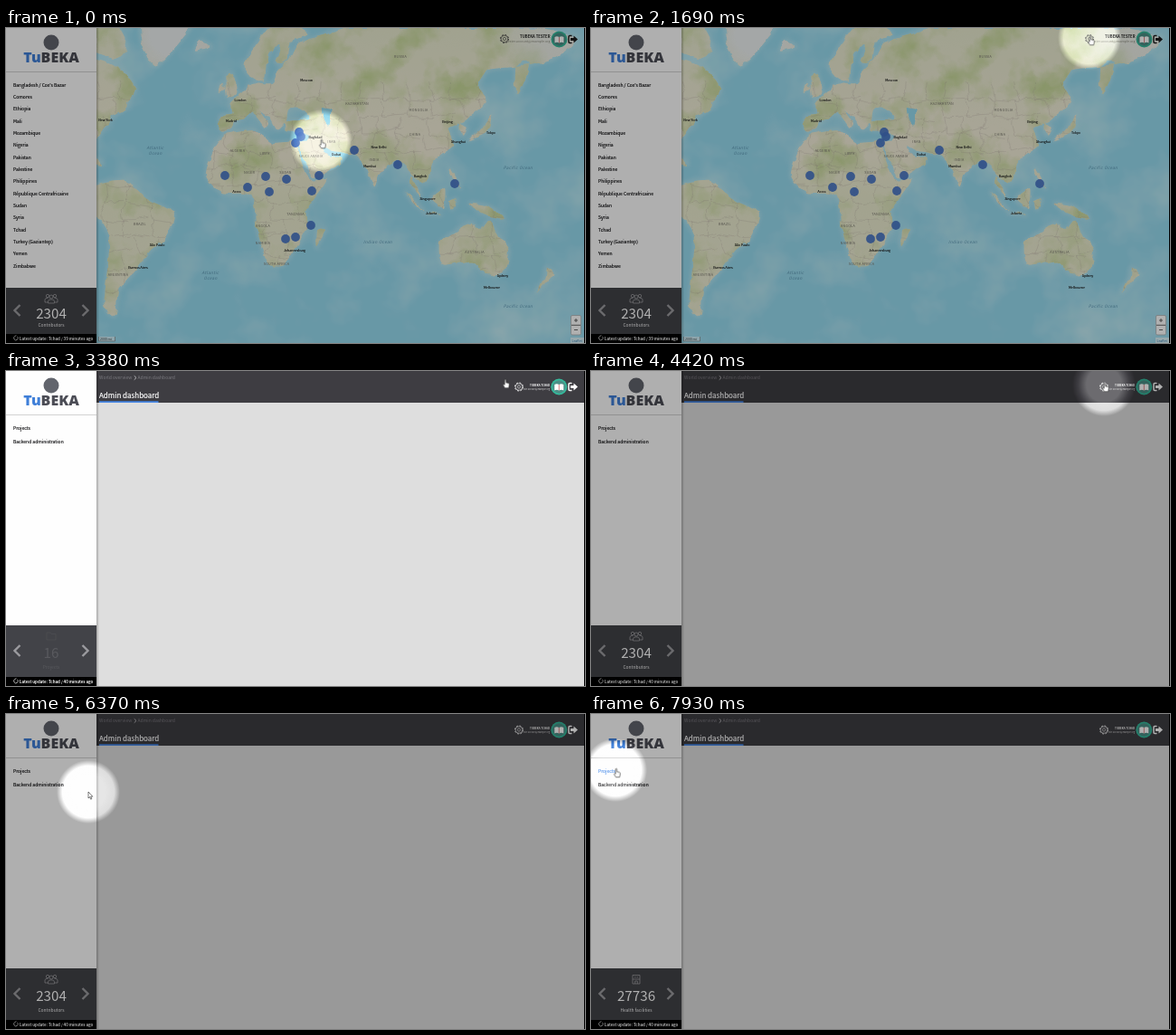
Recreate the animation shown at these times as an HTML page. Size 640 by 348 pixels, loop 8 s.

```html
<!DOCTYPE html>
<html>
<head>
<meta charset="utf-8">
<title>Admin dashboard</title>
<style>
html, body { margin: 0; width: 100%; height: 100%; overflow: hidden; background: #dedede; }
svg { position: absolute; left: 0; top: 0; width: 100vw; height: 100vh; }
text { font-family: "Noto Sans CJK SC", "Noto Sans CJK JP", "Noto Sans CJK", "Noto Sans", sans-serif; }
.mid { text-anchor: middle; }
.end { text-anchor: end; }
.line { fill: none; stroke: currentColor; }
.border { fill: none; stroke: #a99d98; stroke-width: .5; opacity: .45; }
.country { font-size: 3.7px; fill: #77746c; letter-spacing: .25px; }
.city { font-size: 3.6px; fill: #1c1c1c; stroke: #1c1c1c; stroke-width: .12; }
.ocean { font-size: 4.6px; font-style: italic; fill: #5d97b3; letter-spacing: .3px; }
.menu { font-size: 5px; fill: #1d1d1f; stroke: #1d1d1f; stroke-width: .17; }
.status { font-size: 4.4px; font-weight: 700; fill: #fff; }
.logo { font: 800 16px "Open Sans", sans-serif; fill: #4b4c55; }

#map, #dash { will-change: opacity; }
#map { animation: old 8s step-end infinite; }
#dash { animation: fresh 8s step-end infinite; }
#pointer { animation: move 8s infinite; }
#dim { animation: dim 8s step-end infinite; }
#hand { animation: hand 8s step-end infinite; }
#arrow { animation: arrow 8s step-end infinite; }
#link { animation: hover 8s step-end infinite; }
@keyframes old { 0% { opacity: 1 } 42.25%, 100% { opacity: 0 } }
@keyframes fresh { 0% { opacity: 0 } 42.25%, 100% { opacity: 1 } }
@keyframes dim { 0% { opacity: 1 } 42.25% { opacity: 0 } 53.625% { opacity: .5 } 55.25%, 100% { opacity: 1 } }
@keyframes hand { 0% { opacity: 1 } 65% { opacity: 0 } 91%, 100% { opacity: 1 } }
@keyframes arrow { 0% { opacity: 0 } 65% { opacity: 1 } 91%, 100% { opacity: 0 } }
@keyframes hover { 0% { fill: #1d1d1f; stroke: #1d1d1f } 91%, 100% { fill: #3d84ea; stroke: #3d84ea } }
@keyframes move {
  0% { transform: translate(348px, 125px); animation-timing-function: step-end }
  3.25% { transform: translate(348px, 125px); animation-timing-function: steps(7) }
  14.625% { transform: translate(526px, 46px); animation-timing-function: steps(4) }
  21.125% { transform: translate(551px, 11px); animation-timing-function: step-end }
  45.5% { transform: translate(551px, 11px); animation-timing-function: steps(4) }
  52% { transform: translate(567px, 15px); animation-timing-function: step-end }
  63.375% { transform: translate(567px, 15px); animation-timing-function: steps(5) }
  71.5% { transform: translate(322px, 58px); animation-timing-function: steps(2) }
  74.75% { transform: translate(203px, 66px); animation-timing-function: steps(3) }
  79.625% { transform: translate(91px, 86px); animation-timing-function: steps(4) }
  86.125% { transform: translate(41px, 67px); animation-timing-function: steps(4) }
  92.625%, 100% { transform: translate(27px, 62px) }
}
</style>
</head>
<body>
<svg id="map" viewBox="0 0 640 348" preserveAspectRatio="none">
  <defs>
    <linearGradient id="soil" x2="0" y2="1">
      <stop offset="0" stop-color="#e9ebd0"/><stop offset=".38" stop-color="#f5f0db"/>
      <stop offset=".54" stop-color="#ebedcf"/><stop offset="1" stop-color="#f2efd9"/>
    </linearGradient>
    <radialGradient id="ice">
      <stop offset=".4" stop-color="#eef2f2"/><stop offset="1" stop-color="#eef2f2" stop-opacity="0"/>
    </radialGradient>
    <filter id="ridges" x="0" y="0" width="1" height="1" color-interpolation-filters="sRGB">
      <feTurbulence type="fractalNoise" baseFrequency=".014" numOctaves="4" seed="8"/>
      <feColorMatrix values="0 0 0 0 .78  0 0 0 0 .94  0 0 0 0 .97  2 0 0 0 -.9"/>
    </filter>
    <filter id="forest" x="0" y="0" width="1" height="1" color-interpolation-filters="sRGB">
      <feTurbulence type="fractalNoise" baseFrequency=".025" numOctaves="4" seed="3"/>
      <feColorMatrix values="0 0 0 0 .78  0 0 0 0 .85  0 0 0 0 .6  2.4 0 0 0 -1.05"/>
    </filter>
    <filter id="rough" x="0" y="0" width="1" height="1">
      <feTurbulence type="fractalNoise" baseFrequency=".09" numOctaves="2" seed="5" result="noise"/>
      <feDisplacementMap in="SourceGraphic" in2="noise" scale="7" xChannelSelector="R" yChannelSelector="G"/>
    </filter>
    <filter id="soft"><feGaussianBlur stdDeviation="2.2"/></filter>
    <clipPath id="land"><path id="shore"/></clipPath>
  </defs>
  <rect width="640" height="348" fill="#97dcf1"/>
  <rect x="100" width="540" height="348" filter="url(#ridges)"/>
  <path id="shelf" fill="#c3edf5" stroke="#c3edf5" stroke-width="4" opacity=".6" filter="url(#soft)"/>
  <g filter="url(#rough)">
    <rect width="640" height="348" fill="none"/>
    <g clip-path="url(#land)">
      <rect width="640" height="348" fill="url(#soil)"/>
      <rect x="100" width="540" height="348" filter="url(#forest)"/>
      <ellipse cx="185" cy="8" rx="65" ry="55" fill="url(#ice)"/>
      <ellipse cx="630" cy="10" rx="95" ry="60" fill="url(#ice)" opacity=".7"/>
      <g id="borders"></g>
    </g>
    <path id="lake" fill="#97dcf1"/>
  </g>
  <g id="labels"></g>
  <g id="sites" fill="#4774c6" fill-opacity=".92"></g>
  <g color="#3a3a3c">
    <use href="#gear" x="551" y="12"/>
    <text class="end" x="601.5" y="11.3" font-size="4.2" font-weight="700" fill="#222">TUBEKA TESTER</text>
    <text class="end" x="601.5" y="16" font-size="3.6" fill="#8d8d80">tester.account@example.org</text>
    <use href="#avatar" x="611.5" y="12.5"/>
    <use href="#exit" x="626.5" y="12.5" color="#1c1c1e"/>
  </g>
  <rect x="624.5" y="317.5" width="11" height="21.5" rx="1.5" fill="#fff" stroke="#aaa" stroke-width=".7"/>
  <path d="M625 328.3H635M628 323H632M630 321V325M628 333.5H632" stroke="#444" stroke-width=".8"/>
  <rect x="624" y="342" width="16" height="6" fill="#fff" opacity=".6"/>
  <text x="625.5" y="346.5" font-size="3.6" fill="#2f78a8">Leaflet</text>
  <rect x="102.5" y="341" width="18" height="5" fill="#fff" opacity=".5"/>
  <path class="line" d="M102.5 341V346H120.5V341" stroke-width=".6" color="#777"/>
  <text x="104" y="345" font-size="3.5" fill="#333">2000 mi</text>
  <rect width="100" height="348" fill="#fefefe"/>
  <g id="countries"></g>
  <rect y="287" width="100" height="51" fill="#424348"/>
  <rect y="338" width="100" height="10"/>
  <text class="status" x="15" y="344.6">Latest update: Tchad / 39 minutes ago</text>
</svg>

<svg id="dash" viewBox="0 0 640 348" preserveAspectRatio="none">
  <rect width="640" height="348" fill="#dedede"/>
  <rect x="100" width="540" height="35" fill="#3e3d42"/>
  <g font-size="5" fill="#7c7b80">
    <text x="103" y="9.4">World overview</text><text x="145.5" y="9.4">Admin dashboard</text>
  </g>
  <path class="line" d="M141.7 5.3L144 7.5L141.7 9.7" color="#b5b5b8"/>
  <text x="103" y="30.3" font-size="8" fill="#fff" stroke="#fff" stroke-width=".2">Admin dashboard</text>
  <rect x="103" y="33.3" width="65.5" height="1.7" fill="#4789e8"/>
  <g color="#fff" fill="#fff">
    <use href="#gear" x="567" y="17.5"/>
    <text class="end" x="601" y="17" font-size="2.9" font-weight="700">TUBEKA TCHAD</text>
    <text class="end" x="601" y="21" font-size="2.3" fill="#ddd">tester.account@example.org</text>
    <use href="#avatar" x="611.3" y="17.5"/>
    <use href="#exit" x="626.5" y="17.5"/>
  </g>
  <rect width="100" height="348" fill="#fefefe"/>
  <text id="link" class="menu" x="8" y="65">Projects</text>
  <text class="menu" x="8" y="79.8">Backend administration</text>
  <rect y="281" width="100" height="57" fill="#424348"/>
  <rect y="338" width="100" height="10"/>
  <text class="status" x="15" y="344.6">Latest update: Tchad / 40 minutes ago</text>
</svg>

<svg viewBox="0 0 640 348" preserveAspectRatio="none">
  <defs>
    <radialGradient id="light" gradientUnits="userSpaceOnUse" cx="0" cy="0" r="35">
      <stop offset=".55" stop-color="#fff" stop-opacity=".24"/>
      <stop offset=".82" stop-color="#fff" stop-opacity="0"/>
      <stop offset=".82" stop-color="#000" stop-opacity="0"/>
      <stop offset="1" stop-color="#000" stop-opacity=".31"/>
    </radialGradient>
    <linearGradient id="edge"><stop stop-opacity=".25"/><stop offset="1" stop-opacity="0"/></linearGradient>
    <g id="gear" class="line">
      <circle r="4.5" stroke-dasharray="1.77"/>
      <circle r="3.8" stroke-width=".6"/><circle r="1.6" stroke-width=".6"/>
    </g>
    <g id="avatar">
      <circle r="9" fill="#35b99b"/><circle r="7.2" fill="#4b8f86"/>
      <path d="M-5-2.5Q-2.5-4 0-2.5Q2.5-4 5-2.5V4Q2.5 2.5 0 4Q-2.5 2.5-5 4Z" fill="#fff"/>
      <path class="line" d="M0-2.5V4" stroke-width=".8" color="#c66"/>
    </g>
    <g id="exit">
      <path class="line" d="M-1-4H-3.5Q-4.5-4-4.5-3V3Q-4.5 4-3.5 4H-1" stroke-width="1.5"/>
      <path d="M-2.5-1.5H1V-4L5.5 0L1 4V1.5H-2.5Z" fill="currentColor"/>
    </g>
    <g id="people" class="line" stroke-width=".7">
      <circle cx="-4" cy="-3" r="1.7"/><circle cx="4" cy="-3" r="1.7"/><circle cy="-2" r="2"/>
      <path d="M-3.5 5V3Q-3.5 .8 0 .8T3.5 3V5ZM-4 4H-7V1Q-7-.8-3.5-.8M4 4H7V1Q7-.8 3.5-.8"/>
    </g>
    <path id="building" class="line" stroke-width=".7" d="M-4 5V-4.5H4V5ZM-4 0H4M-1.3 5V2H1.3V5M-2-2.2H-.5M.5-2.2H2"/>
    <path id="folder" class="line" stroke-width=".7" d="M-5 4V-4H-1L0-2.5H5V4Z"/>
  </defs>
  <rect x="100" width="3" height="348" fill="url(#edge)"/>
  <rect y="48" width="100" height="1" fill="#d2d2d2"/>
  <circle cx="50" cy="16" r="8.5" fill="#62656d"/>
  <text class="logo mid" x="50" y="38"><tspan fill="#3f7fd8">Tu</tspan>BEKA</text>
  <path class="line" d="M10 340.4A2.3 2.3 0 1 0 12.6 340.9M10 340.4L11.4 339.5" stroke-width=".7" color="#fff"/>
  <path id="chevrons" class="line" d="M15.5 303L9.5 309L15.5 315M84.5 303L90.5 309L84.5 315" stroke-width="2.4" color="#9b9b9f"/>
  <g id="counter" color="#a9a9ad" fill="#fff">
    <use id="icon" x="50"/>
    <text id="number" class="mid" x="50" font-size="15.2"></text>
    <text id="caption" class="mid" x="50" font-size="4.9"></text>
  </g>
  <rect x="639" width="1" height="348"/>
  <g id="pointer">
    <rect id="dim" x="-700" y="-400" width="1440" height="800" fill="url(#light)"/>
    <g fill="#fff" stroke="#222" stroke-width=".6">
      <path id="hand" transform="translate(.8 .3)" d="M-.7 4V-1.5Q.1-2.6 .9-1.5V1.6L3.6 2.2Q4.6 2.5 4.5 3.6L3.8 7.5H-.3L-2.4 4.3Q-2 3-.7 4Z"/>
      <path id="arrow" d="M0 0V7L1.6 5.6L2.7 8.2L3.8 7.7L2.7 5.2H4.8Z"/>
    </g>
  </g>
</svg>

<script>
const $ = id => document.getElementById(id);

function add(parent, tag, attrs, text = '') {
  const el = document.createElementNS('http://www.w3.org/2000/svg', tag);
  for (const key in attrs) el.setAttribute(key, attrs[key]);
  el.textContent = text;
  parent.append(el);
}

// Mercator projection, 1.97 px per degree
const project = ([lon, lat]) =>
  [254.5 + 1.97 * lon, 191 - 112.9 * Math.asinh(Math.tan(lat * Math.PI / 180))];

// Closed spline through a few "lon lat" key points
function coast(text) {
  const p = text.split(',').map(pair => project(pair.trim().split(' ').map(Number)));
  const at = i => p[(i + p.length) % p.length];
  const lean = (i, k) => at(i).map((v, d) => (v + k * (at(i + 1)[d] - at(i - 1)[d]) / 9).toFixed(1));
  return 'M' + at(0) + p.map((_, i) => `C${lean(i, 1)} ${lean(i + 1, -1)} ${at(i + 1)}`).join('') + 'Z';
}

const africa = '-6 35, 10 37, 20 31, 33 31, 38 18, 43 11.5, 51 12, 40 -4, 40 -15, 33 -26, 26 -34, 18 -33, 12 -17, 9 3, -8 4.5, -17 14, -13 27';
const asia = '28 60, 36 66, 70 70, 110 76, 160 70, 190 67, 178 62, 160 60, 142 59, 136 54, 140 48, 128 41, 119 38, 122 30, 110 21, 107 11, 100 13, 97 17, 90 22, 80 15, 77 8, 72 20, 66 25, 54 27, 46 31, 36 36, 28 37, 28 41, 41 42, 36 46, 28 48';
const arabia = '35 31, 46 33, 51 25, 59 23, 52 16, 44 13, 39 21';
const europe = '-9 37, -9 43, -2 44, -4 48, 4 52, 9 55, 20 55, 24 59, 32 61, 42 50, 30 46, 28 41, 23 37, 19 42, 13 45, 8 44, 0 40, -4 37';
const nordic = '6 58, 5 61, 15 68, 25 71, 40 68, 30 66, 28 61, 22 61, 25 65, 21 65, 17 61, 16 56, 12 56';
const australia = '114 -23, 122 -18, 131 -12, 137 -16, 142 -11, 148 -20, 153 -27, 150 -37, 140 -38, 132 -32, 116 -34';
const south = '-80 8, -62 11, -50 1, -35 -7, -40 -21, -48 -27, -57 -37, -66 -45, -68 -54, -74 -50, -71 -20, -80 -5';
const north = '-90 30, -81 30, -70 42, -62 46, -60 50, -56 53, -64 59, -78 62, -95 60';
const arctic = ['-45 60, -53 66, -52 74, -18 74, -28 68', '-66 62, -62 66, -75 73, -85 66', '-23 64, -14 65, -20 66.5'];
const atlantic = ['-5 50, 1 52, -3 58, -6 56', '-10 52, -6 53, -8 55', '9 44, 13 45, 18 40, 16 38, 12 42', '-85 22, -75 20, -78 23'];
const indian = ['45 -25, 50 -16, 45 -17', '95 5, 105 -5, 100 -2', '99 13, 104 2, 98 9', '105 -7, 115 -8, 110 -7'];
const pacific = ['109 1, 117 7, 116 -4', '120 0, 124 1, 121 -5', '131 -1, 142 -3, 150 -10, 138 -7', '120 18, 126 7, 121 12',
  '130 32, 141 36, 144 44, 137 37', '124 40, 129 38, 127 34', '157 51, 162 56, 164 61, 157 60', '174 -35, 178 -38, 168 -46, 173 -40'];

const shore = [africa, asia, arabia, europe, nordic, australia, south, north, ...arctic, ...atlantic, ...indian, ...pacific]
  .map(coast).join('');
$('shore').setAttribute('d', shore);
$('shelf').setAttribute('d', shore);
$('lake').setAttribute('d', coast('48 46, 53 45, 52 38, 49 41'));

// Frontiers: a loose brick pattern, seen only on land
let seed = 7;
const random = () => (seed = seed * 16807 % 2147483647) / 2147483647;
const wobble = size => (random() - .5) * size;
for (let y = 60; y < 280; y += 19)
  for (let x = 100 + 20 * random(); x < 600; x += 19 + 14 * random())
    add($('borders'), 'path', { class: 'border', d: `M${x} ${y}l${wobble(9)} 9l${wobble(9)} 10l14 ${wobble(9)}l14 ${wobble(6)}` });

const labels = {
  ocean: 'Atlantic,165,134;Ocean,165,140;Atlantic,226,272;Ocean,226,278;Indian Ocean,411,238;Pacific Ocean,566,156;Pacific Ocean,566,309',
  country: 'RUSSIA,436,33;KAZAKHSTAN,388,85;MONGOLIA,456,92;CHINA,452,119;INDIA,407,147;IRAN,360,127;ALGERIA,256,137;LIBYA,286,140;NIGER,269,161;SUDAN,309,161;SAUDI ARABIA,337,143;ANGOLA,284,220;TANZANIA,320,207;NAMIBIA,284,239;SOUTH AFRICA,299,262;BRAZIL,148,218;ARGENTINA,124,274;AUSTRALIA,518,249',
  city: 'Moscow,332,59;London,259,81;Madrid,249,104;Baghdad,342,122;Dubai,365,141;New Delhi,412,133;Mumbai,402,154;Beijing,488,105;Shanghai,500,127;Tokyo,536,117;Bangkok,458,165;Singapore,466,190;Jakarta,470,206;Sydney,549,275;Melbourne,537,288;Johannesburg,319,247;Accra,255,182;São Paulo,167,241;Buenos Aires,146,266;New York,110,103'
};
for (const kind in labels)
  for (const item of labels[kind].split(';')) {
    const [name, x, y] = item.split(',');
    add($('labels'), 'text', { class: kind + ' mid', x, y }, name);
  }

const sites = '242,163 267,176 287,164 291,181 310,167 320,127 324,115 326,120 346,163 338,180 337,218 320,231 309,233 385,135 433,151 496,172';
for (const site of sites.split(' ')) {
  const [cx, cy] = site.split(',');
  add($('sites'), 'circle', { cx, cy, r: 4.9 });
}

["Bangladesh / Cox's Bazar", 'Comores', 'Ethiopia', 'Mali', 'Mozambique', 'Nigeria', 'Pakistan', 'Palestine',
  'Philippines', 'République Centrafricaine', 'Sudan', 'Syria', 'Tchad', 'Turkey (Gaziantep)', 'Yemen', 'Zimbabwe']
  .forEach((name, i) => add($('countries'), 'text', { class: 'menu', x: 8, y: 64.8 + i * 13.33 }, name));

const people = [2304, 'Contributors', 'people'];
const places = [27736, 'Health facilities', 'building'];
const projects = [16, 'Projects', 'folder'];
const slides = [
  { at: -2000, dur: 900, show: people },
  { at: 1950, dur: 1040, show: places },
  { at: 3333, dur: 1, show: projects },
  { at: 3510, dur: 900, show: people },
  { at: 6500, dur: 1430, show: places }
];

function draw(now) {
  const t = Math.floor(now % 8000 / 130) * 130;
  const { at, dur, show: [value, label, icon] } = slides.findLast(s => s.at <= t);
  const p = Math.min(1, (t - at) / dur);
  $('number').textContent = Math.round(value * (1 - (1 - p) ** 3));
  $('caption').textContent = label;
  $('icon').setAttribute('href', '#' + icon);
  $('counter').setAttribute('opacity', Math.min(1, (t - at) / 390));

  const onMap = t < 3380;
  $('chevrons').setAttribute('transform', `translate(0 ${onMap ? 3 : 0})`);
  $('icon').setAttribute('y', onMap ? 299 : 293);
  $('number').setAttribute('y', onMap ? 320.7 : 317);
  $('caption').setAttribute('y', onMap ? 329.8 : 328.8);
}

let start;
function tick(now) {
  start ??= now;
  draw(now - start);
  requestAnimationFrame(tick);
}
draw(0);
requestAnimationFrame(tick);
</script>
</body>
</html>
```
